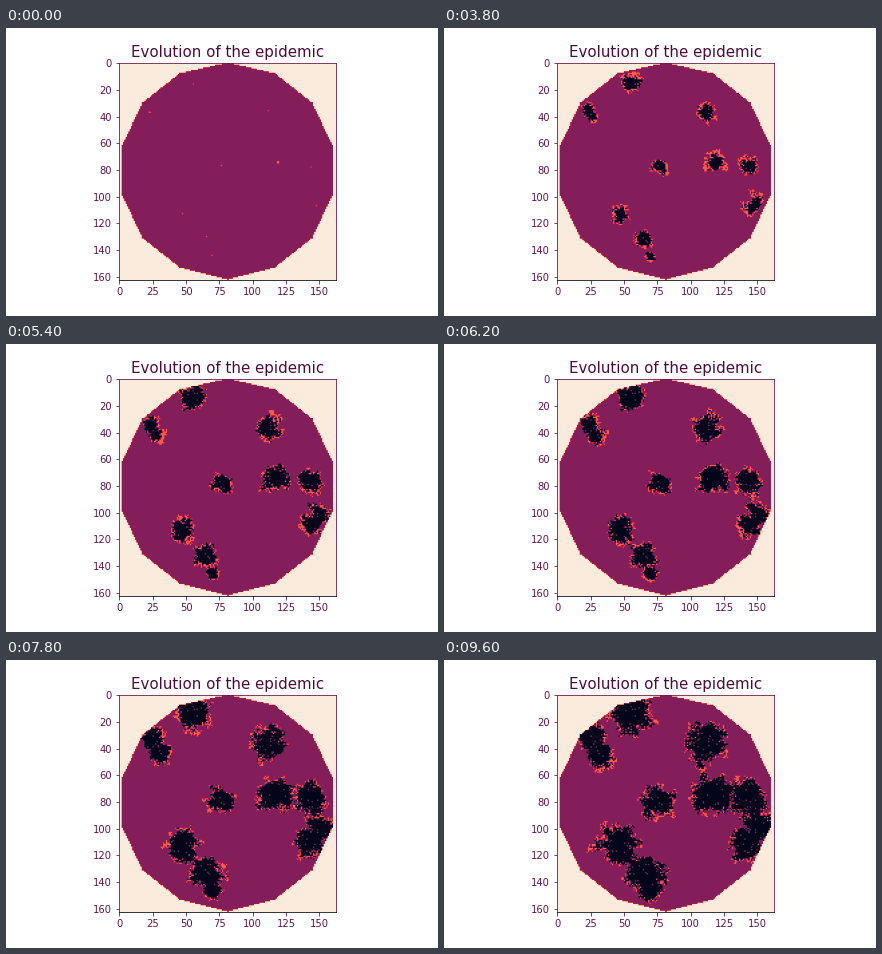
These frames come from a looping animation (432 by 288 pixels, 9.8 s). A matplotlib script:

```python
import numpy as np
import matplotlib.pyplot as plt
from matplotlib.animation import FuncAnimation
from matplotlib.colors import LinearSegmentedColormap

SIZE = 163
FRAMES = 49
INTERVAL = 200
LAST = FRAMES - 1
DEAD, HEALTHY, SICK, OUTSIDE = range(4)
TITLE_INK = "#4f0a3c"
AXIS_INK = "#64144c"
ROCKET = ["#03051a", "#3f1b43", "#841e5a", "#cb1b4f",
          "#f06043", "#f6b48f", "#faebdd"]

# Each outbreak drifts from its first case to a final center: start, end, reach
OUTBREAKS = [
    ((55, 16), (55, 15), 15),
    ((22.5, 37), (26, 32), 11),
    ((22.5, 37), (33, 46), 10),
    ((111, 36), (111, 36), 16),
    ((118.5, 74.5), (116, 75), 15),
    ((143, 78), (143, 77), 15),
    ((76, 77), (75, 80), 12),
    ((147, 107), (152, 99), 12),
    ((147, 107), (141, 112), 13),
    ((47, 113), (45, 113), 15),
    ((65, 130), (66, 135), 14),
    ((69, 144), (69, 147), 8),
]

rng = np.random.default_rng(4)
ys, xs = np.mgrid[:SIZE, :SIZE]


def polygon_mask(sides=14, radius=81):
    """Regular polygon whose corners are cut down to whole cells."""
    angles = np.arange(sides + 1) * 2 * np.pi / sides
    px = np.floor(radius + radius * np.sin(angles) + 1e-9)
    py = np.floor(radius - radius * np.cos(angles) + 1e-9)
    inside = np.ones((SIZE, SIZE), bool)
    for x0, y0, x1, y1 in zip(px, py, px[1:], py[1:]):
        inside &= (x1 - x0) * (ys - y0) - (y1 - y0) * (xs - x0) >= 0
    return inside


def spread(field, mix):
    """Combine every cell with its eight neighbours."""
    for axis in (0, 1):
        field = mix([np.roll(field, s, axis) for s in (-1, 0, 1)], axis=0)
    return field


def roughness():
    """Uneven resistance that makes the fronts ragged."""
    smooth = rng.normal(size=(SIZE, SIZE))
    for _ in range(4):
        smooth = spread(smooth, np.mean)
    smooth /= smooth.std()
    return np.exp(0.16 * smooth + 0.14 * rng.normal(size=(SIZE, SIZE)))


def reached(day, rough):
    """Cells within range of any outbreak on the given day."""
    t = day / LAST
    near = np.zeros((SIZE, SIZE), bool)
    for start, end, reach in OUTBREAKS:
        x, y = np.add(start, t * np.subtract(end, start))
        near |= np.hypot(xs - x, ys - y) * rough <= reach * t ** 0.8
    return near


def simulate():
    inside = polygon_mask()
    rough = roughness()
    susceptible = inside & (rng.random((SIZE, SIZE)) > 0.04)
    illness = rng.uniform(1, 8, (SIZE, SIZE))
    caught = np.full((SIZE, SIZE), np.inf)
    for (x, y), _, _ in OUTBREAKS:
        caught[np.hypot(xs - x, ys - y) < 0.75] = 0

    grids = []
    for day in range(FRAMES):
        exposed = spread(np.isfinite(caught), np.any) & np.isinf(caught)
        if day:
            caught[exposed & susceptible & reached(day, rough)] = day
        grid = np.full((SIZE, SIZE), HEALTHY, float)
        grid[caught <= day] = SICK
        grid[caught + illness <= day] = DEAD
        grid[~inside] = OUTSIDE
        grids.append(grid)
    return grids


grids = simulate()

plt.rcParams["font.family"] = "DejaVu Sans"
fig, ax = plt.subplots(figsize=(6, 4), dpi=72, facecolor="white")
fig.subplots_adjust(left=0.125, right=0.9, bottom=0.125, top=0.88)

# Smoothing the values, not the colours, gives the red rim of the polygon.
image = ax.imshow(grids[0], vmin=DEAD, vmax=OUTSIDE,
                  cmap=LinearSegmentedColormap.from_list("rocket_like", ROCKET),
                  interpolation="hanning", interpolation_stage="data")
ax.set_title("Evolution of the epidemic", fontsize=15, color=TITLE_INK, pad=6)
ax.set_xticks(range(0, 151, 25))
ax.set_yticks(range(0, 161, 20))
ax.tick_params(labelsize=10, colors=AXIS_INK)
for side, spine in ax.spines.items():
    spine.set_color(ROCKET[0] if side == "bottom" else AXIS_INK)


def update(day):
    image.set_data(grids[day])
    return [image]


anim = FuncAnimation(fig, update, frames=FRAMES, interval=INTERVAL,
                     repeat=True, repeat_delay=0)
plt.show()
```
